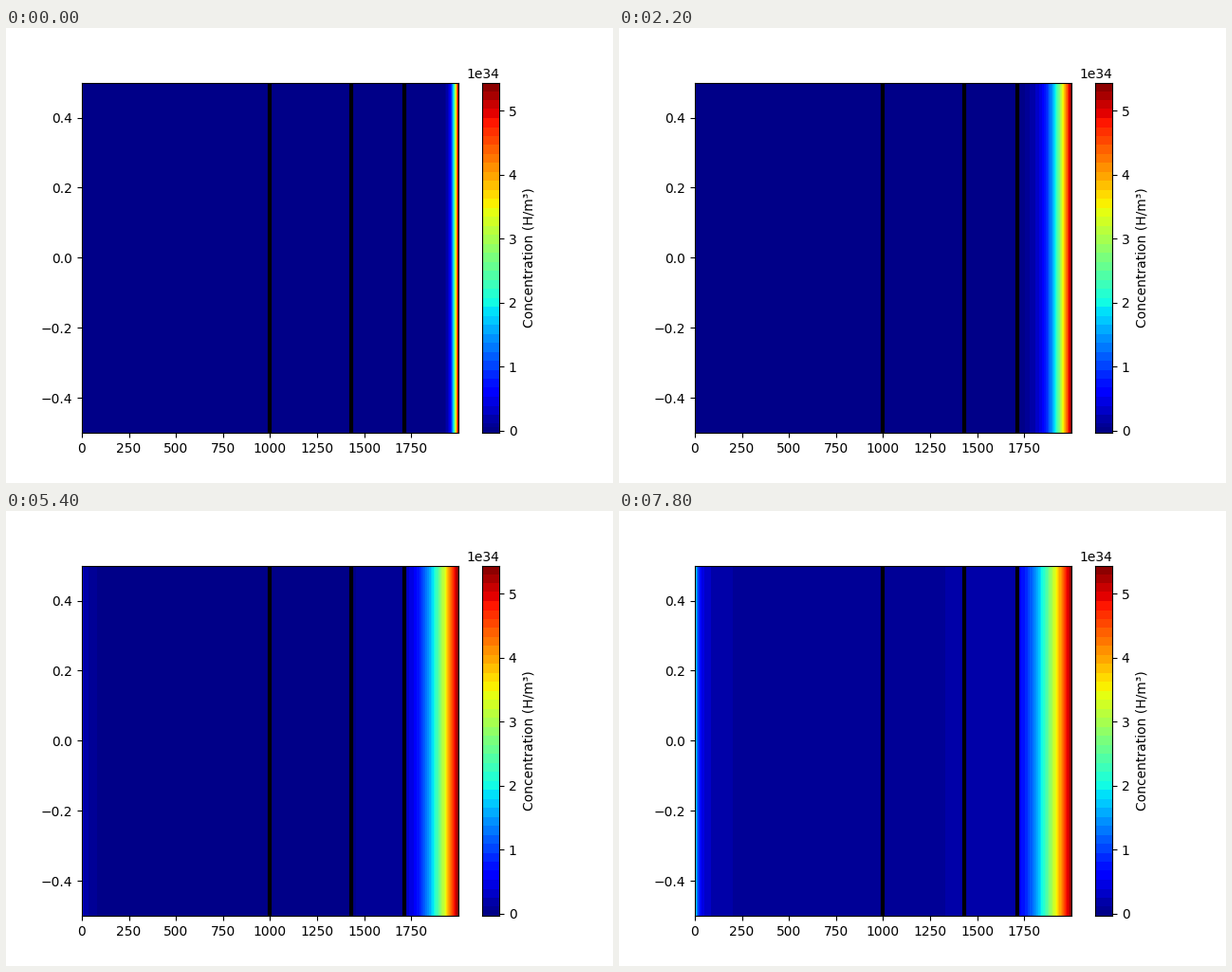
A matplotlib script that plays this animation: 640x480 px, repeating every 8 s.

```python
import math

import matplotlib.pyplot as plt
import numpy as np
from matplotlib.animation import FuncAnimation

FRAMES, INTERVAL = 40, 200
LOW, HIGH = -0.04, 5.436      # colour range in units of 1e34
WIDTH = 396.8                 # plot width in pixels
LENGTH = 1999
INTERFACES = [1000, 1428.5, 1714]

levels = np.concatenate([[LOW, 0.05], np.linspace(0.1, HIGH, 39)])
mids = (levels[:-1] + levels[1:]) / 2
colors = plt.get_cmap("jet")((mids - LOW) / (HIGH - LOW))[:, :3]

x = np.linspace(0, LENGTH, 2000)
depth = x / LENGTH * WIDTH
wall = INTERFACES[-1] / LENGTH * WIDTH
erfc = np.vectorize(math.erfc)


def shade(values):
    band = np.searchsorted(levels, values, side="right") - 1
    return colors[np.clip(band, 0, len(colors) - 1)]


def concentration(n):
    # front diffusing in from the right surface
    front = 5.43 * erfc((WIDTH - depth) / math.sqrt(58 * (n + 1)))

    # slow build-up in the other layers and at the left surface
    u = max(0, (n - 21) / 18)
    inner = np.zeros_like(depth)
    if u > 0:
        inner += 0.06 * u ** 0.35
        inner += 0.09 * u ** 1.6 * (depth / wall) ** 3.2
        inner += 2.2 * math.exp(-0.22 * (39 - n)) * np.exp(-depth / 2.5)
        inner += 0.5 * u * np.exp(-depth / (16 * u))
    return np.where(depth > wall, front, inner)


fig = plt.figure(figsize=(6.4, 4.8), dpi=100)
ax = fig.add_axes([0.125, 0.11, 0.62, 0.77])
cax = fig.add_axes([0.78375, 0.11, 0.028875, 0.77])

field = ax.imshow(shade(concentration(0))[None], extent=(0, LENGTH, -0.5, 0.5),
                  aspect="auto", interpolation="nearest")
for pos in INTERFACES:
    ax.axvline(pos, color="black", lw=3)
ax.set_xticks(np.arange(0, 2000, 250))
ax.set_yticks([-0.4, -0.2, 0, 0.2, 0.4])

scale = np.linspace(LOW, HIGH, 2000)
cax.imshow(shade(scale)[:, None], extent=(0, 1, LOW * 1e34, HIGH * 1e34),
           origin="lower", aspect="auto", interpolation="nearest")
cax.set_xticks([])
cax.set_yticks(np.arange(6) * 1e34)
cax.yaxis.tick_right()
cax.yaxis.set_label_position("right")
cax.yaxis.set_offset_position("right")
cax.set_ylabel("Concentration (H/m³)")


def update(n):
    field.set_data(shade(concentration(n))[None])
    return [field]


anim = FuncAnimation(fig, update, frames=FRAMES, interval=INTERVAL,
                     repeat=True, repeat_delay=0)
plt.show()
```
